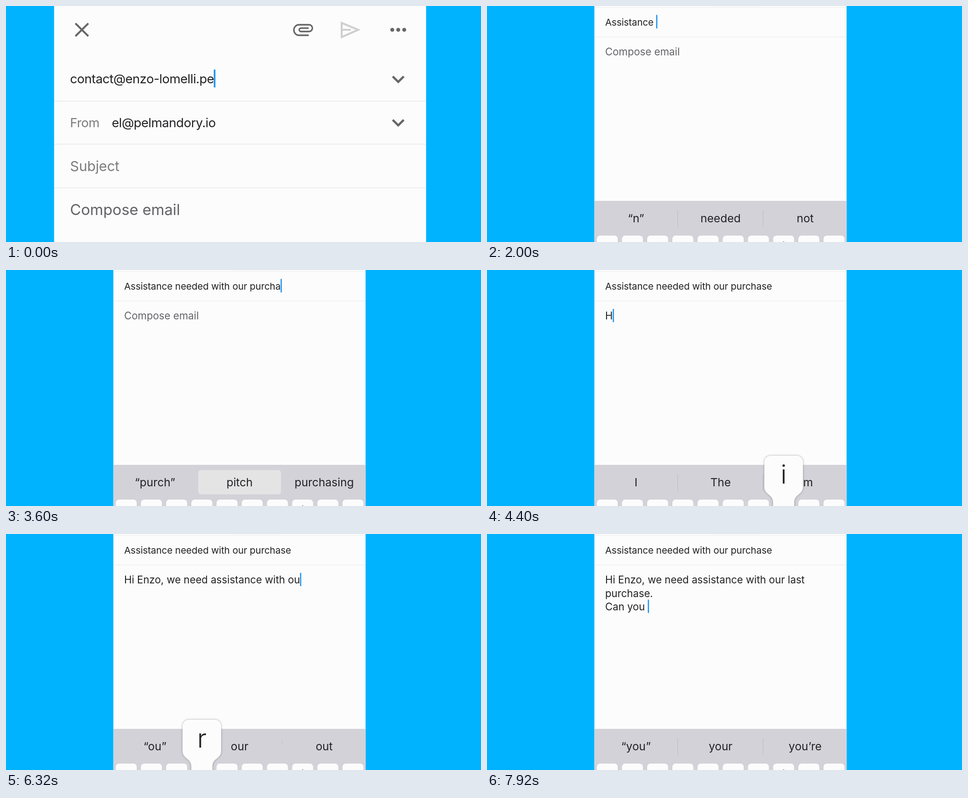
Animation, 1033 px wide and 516 px high, one loop 8 s. Source, as an HTML page with a canvas:

```html
<!DOCTYPE html>
<html lang="en">
<head>
<meta charset="utf-8">
<title>Composing an email</title>
<style>
html, body { margin: 0; width: 100%; height: 100%; overflow: hidden; background: #00b3ff; }
canvas { display: block; }
</style>
</head>
<body>
<canvas id="stage" width="1033" height="516"></canvas>
<script>
const ctx = document.getElementById('stage').getContext('2d');
const LOOP = 8000;
const FAMILY = 'Inter, "Open Sans", sans-serif';
const SKY = '#00b3ff', INK = '#222224', ICON = '#666668', BLUE = '#1d92f2';

// The camera moves from the address rows (scale 1) to the whole phone (scale ZOOM).
const ZOOM = 0.678, END_X = 162.56, END_Y = -201.76;
const PAN_START = 120, PAN_END = 820;

// Each run types its text evenly between two times.
const TO = [[60, 400, 'lmandory.io']];
const SUBJECT = [
  [780, 1170, 'Assis'], [1290, 1800, 'tance '], [1920, 2540, 'needed'],
  [2740, 3490, ' with our purcha'], [3710, 3830, 'se']
];
const BODY = [
  [4300, 5250, 'Hi Enzo, we ne'], [5360, 6260, 'ed assistance with ou'],
  [6310, 6660, 'r last '], [6740, 7160, 'purchase.'], [7280, 7860, '\nCan you ']
];
const FOCUS_SUBJECT = 560, FOCUS_BODY = 4080;

// time, three suggestions, style of the separators
const HINTS = [
  [0, 'I', 'The', 'I’m', 'both'],
  [860, '“A”', 'And', 'Are', ''],
  [1360, '“Assis”', 'Assist', 'Assists', ''],
  [1680, '“Assistan”', 'Assistant', 'Assistance', ''],
  [1960, '“n”', 'needed', 'not', 'both'],
  [2240, '“need”', 'needed', 'needs', 'both'],
  [2560, '“needed”', '', '', 'both'],
  [2860, '“wi”', 'with', 'will', 'both'],
  [3100, '“ou”', 'our', 'out', 'both'],
  [3440, '“purch”', 'pitch', 'purchasing', 'pick'],
  [3720, '“purchas”', 'purchase', 'purchased', ''],
  [4080, 'I', 'The', 'I’m', 'both'],
  [4420, '“Hi”', 'His', 'Hit', 'both'],
  [4640, '“Enzo”', 'End', 'Enjoy', 'both'],
  [5080, '“we”', 'were', 'well', 'right'],
  [5400, '“need”', 'needed', 'needs', 'right'],
  [5640, '“assis”', 'assist', 'assistance', 'right'],
  [6080, '“wit”', 'with', 'without', 'right'],
  [6280, '“ou”', 'our', 'out', 'right'],
  [6520, '“las”', 'last', 'late', 'right'],
  [6860, '“purch”', 'purchase', 'purchased', 'right'],
  [7440, '“Ca”', 'Can', 'Call', 'both'],
  [7740, '“you”', 'your', 'you’re', 'both']
];

const ROWS = ['qwertyuiop', 'asdfghjkl'];
const PITCH = 54.8, KEY_W = 45.5, KEY_TOP = 502, ROW_H = 80;

const charTime = ([from, to, text], i) => from + (to - from) * (i + 1) / text.length;

function typed(runs, t) {
  let out = '';
  for (const run of runs)
    out += [...run[2]].filter((c, i) => charTime(run, i) <= t).join('');
  return out;
}

// A key pops up just before its letter appears and stays a moment after it.
function pressedKey(t) {
  let key = '';
  for (const run of [...TO, ...SUBJECT, ...BODY])
    [...run[2]].forEach((c, i) => {
      const at = charTime(run, i);
      if (t >= at - 60 && t < at + 60) key = c;
    });
  return key;
}

function font(size, spacing = 0, weight = 400) {
  ctx.font = `${weight} ${size}px ${FAMILY}`;
  ctx.letterSpacing = spacing + 'px';
}

function label(text, x, y, color, align = 'left') {
  ctx.textAlign = align;
  ctx.fillStyle = color;
  ctx.fillText(text, x, y);
}

function box(x, y, w, h, r, color) {
  ctx.fillStyle = color;
  ctx.beginPath();
  ctx.roundRect(x, y, w, h, r);
  ctx.fill();
}

function line(points, width, color) {
  ctx.strokeStyle = color;
  ctx.lineWidth = width;
  ctx.beginPath();
  points.forEach(([x, y]) => ctx.lineTo(x, y));
  ctx.stroke();
}

function caret(x, y, h, w) {
  box(x, y, w, h, 0, BLUE);
}

function clip() {
  ctx.save();
  ctx.translate(625, 52.5);
  ctx.scale(2.15, 2.3);
  ctx.translate(-2, -12.5);
  ctx.strokeStyle = ICON;
  ctx.lineWidth = 1.5;
  ctx.stroke(new Path2D('M17.5 17.5H7.5a5 5 0 0 1 0-10H18a3.2 3.2 0 0 1 0 6.4H9.5a1.6 1.6 0 0 1 0-3.2H17.5'));
  ctx.restore();
}

function sendIcon() {
  line([[730, 52], [730, 37], [766, 52], [730, 68], [730, 52], [750, 52]], 4.2, '#cfcfd1');
}

function header(t) {
  line([[151, 38], [179, 66]], 4, ICON);
  line([[179, 38], [151, 66]], 4, ICON);
  clip();
  sendIcon();
  for (const x of [840, 853, 866]) box(x - 4.3, 47.7, 8.6, 8.6, 4.3, ICON);
  for (const y of [160, 255]) line([[841, y - 6], [853, y + 6], [865, y - 6]], 4.6, ICON);
  for (const y of [208, 302, 397.5]) line([[105, y], [913.5, y]], 1.4, '#e9e9ea');

  font(27.5, -0.5);
  const to = 'contact@enzo-lomelli.pe' + typed(TO, t);
  label(to, 139.3, 168.5, INK);
  if (t < FOCUS_SUBJECT) caret(139.3 + ctx.measureText(to).width - 0.5, 139, 39, 3.6);
  label('From', 139.3, 265, '#7c7c7e');
  label('el@pelmandory.io', 230, 265, INK);
}

function wrap(text, width) {
  const lines = [];
  for (const part of text.split('\n')) {
    let row = '';
    for (const word of part.split(/(?<= )/)) {
      if (row && ctx.measureText(row + word.trimEnd()).width > width) {
        lines.push(row);
        row = '';
      }
      row += word;
    }
    lines.push(row);
  }
  return lines;
}

function message(t) {
  font(20.6, -0.1);
  const subject = typed(SUBJECT, t);
  label(subject || 'Subject', 257, 42.8, subject ? INK : '#7c7c7e');
  if (t >= FOCUS_SUBJECT && t < FOCUS_BODY)
    caret(257 + ctx.measureText(subject).width, 19.5, 29.5, 2.6);

  font(22.2);
  const body = typed(BODY, t);
  if (!body) label('Compose email', 257, 108.3, '#636367');
  const lines = wrap(body, 498);
  lines.forEach((row, i) => label(row, 257, 108.3 + i * 29.3, INK));
  if (t >= FOCUS_BODY) {
    const n = lines.length - 1;
    caret(257 + ctx.measureText(lines[n]).width, 85 + n * 29.3, 29, 2.6);
  }
}

function popup(key) {
  const low = key.toLowerCase();
  const row = ROWS.findIndex(keys => keys.includes(low));
  if (!low.trim() || row < 0) return;
  const x = 261.5 + PITCH * (ROWS[row].indexOf(low) + row / 2);
  const y = KEY_TOP + row * ROW_H;
  ctx.save();
  ctx.translate(x, y);
  ctx.beginPath();
  ctx.moveTo(-23, 60);
  ctx.lineTo(-23, 6);
  ctx.bezierCurveTo(-23, -12, -42, -10, -42, -28);
  ctx.lineTo(-42, -82);
  ctx.arcTo(-42, -96, -28, -96, 14);
  ctx.lineTo(28, -96);
  ctx.arcTo(42, -96, 42, -82, 14);
  ctx.lineTo(42, -28);
  ctx.bezierCurveTo(42, -10, 23, -12, 23, 6);
  ctx.lineTo(23, 60);
  ctx.shadowColor = 'rgba(0,0,0,0.35)';
  ctx.shadowBlur = 4;
  ctx.fillStyle = '#fcfcfc';
  ctx.fill();
  ctx.shadowColor = 'transparent';
  font(57, 0, 300);
  label(key, 0, -35, INK, 'center');
  ctx.restore();
}

function keyboard(t) {
  box(234, 426, 548.3, 420, 0, '#d3d2d8');
  const [, left, mid, right, style] = HINTS.filter(h => h[0] <= t).pop();
  if (style === 'pick') box(418, 437.5, 180, 53, 6, '#e4e4e5');
  if (style === 'both')
    for (const x of [414.5, 600.5]) line([[x, 447], [x, 483]], 1, '#bdbcc2');
  if (style === 'right') line([[600.5, 447], [600.5, 461]], 1, '#c2c1c7');
  font(24.5);
  [left, mid, right].forEach((word, i) => label(word, 324 + 184 * i, 473, INK, 'center'));

  font(31, 0, 300);
  [...ROWS[0]].forEach((c, i) => {
    const x = 261.5 + PITCH * i;
    box(x - KEY_W / 2, KEY_TOP, KEY_W, 58, 7, '#fcfcfc');
    label(c, x, 538.5, INK, 'center');
  });
  popup(pressedKey(t));
}

function draw(t) {
  const p = Math.min(1, Math.max(0, (t - PAN_START) / (PAN_END - PAN_START)));
  const s = p * p * (3 - 2 * p);
  const k = 1 + (ZOOM - 1) * s;

  ctx.setTransform(1, 0, 0, 1, 0, 0);
  ctx.fillStyle = SKY;
  ctx.fillRect(0, 0, 1033, 516);
  ctx.setTransform(k, 0, 0, k, END_X * s, END_Y * s);
  box(104.6, -50, 809, 1400, 0, '#fcfcfc');
  header(t);

  ctx.scale(1 / ZOOM, 1 / ZOOM);
  ctx.translate(-END_X, -END_Y);
  message(t);
  keyboard(t);
}

const start = performance.now();
function tick() {
  draw((performance.now() - start) % LOOP);
  requestAnimationFrame(tick);
}
draw(0);
requestAnimationFrame(tick);
</script>
</body>
</html>
```
